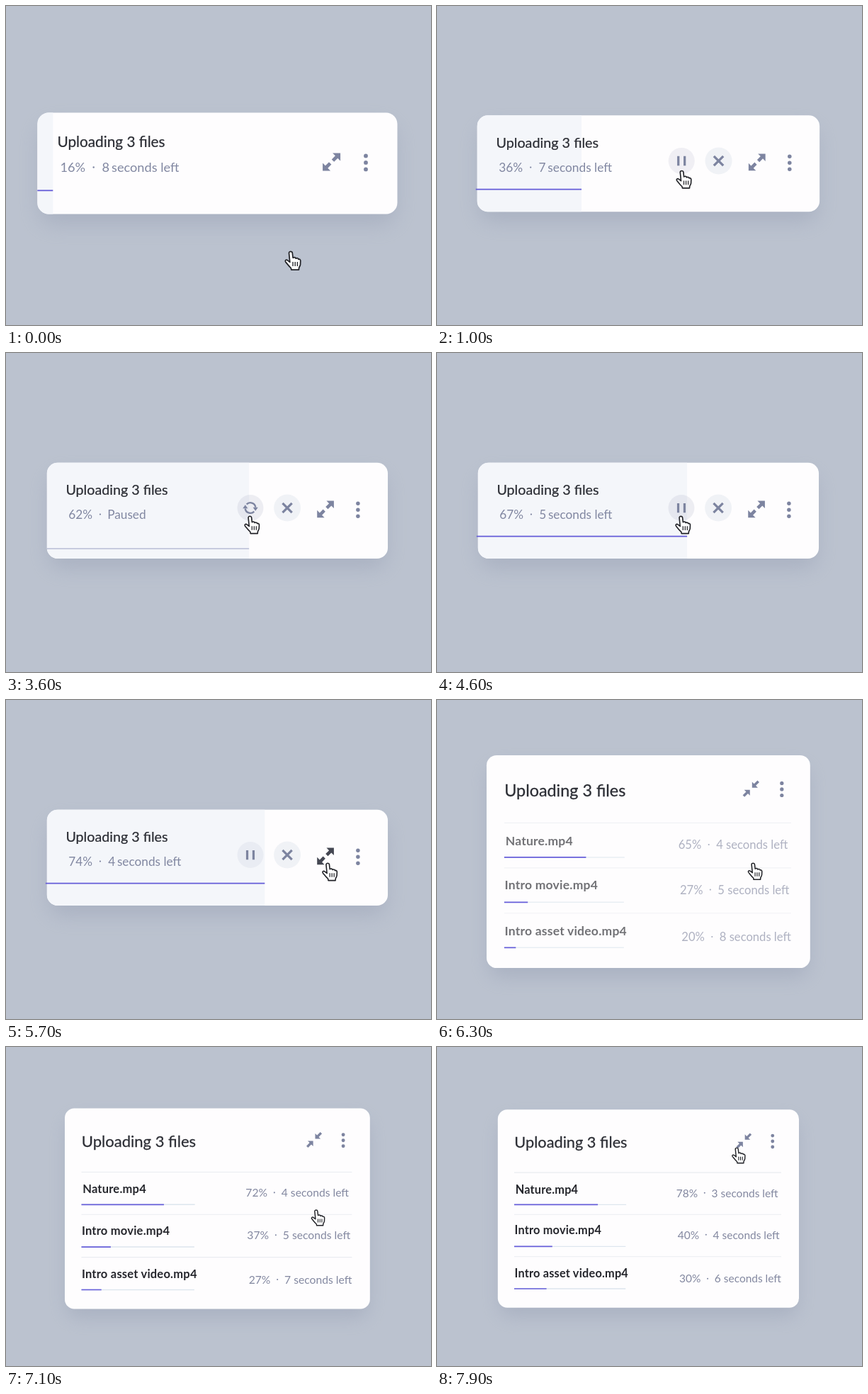
Animation of 600 by 450 pixels, one loop 8 s. Source, as an HTML page:

```html
<!DOCTYPE html>
<html lang="en">
<head>
<meta charset="utf-8">
<title>Upload card</title>
<style>
  html, body { margin: 0; width: 100%; height: 100%; overflow: hidden; background: #bbc2cf; }
  svg { display: block; width: 600px; height: 450px; }
  text { font-family: Lato, "Open Sans", sans-serif; white-space: pre; }
  .title { font-size: 20.8px; fill: #2c2e35; stroke: #2c2e35; stroke-width: .25px; }
  .sub { font-size: 18.2px; fill: #8187a1; }
  .meta { font-size: 18.5px; fill: #8388a0; }
  .name { font-size: 19.5px; font-weight: 700; letter-spacing: .25px; fill: #25262c; }
  .icon { fill: #7d84a0; }
  .stroke { fill: none; stroke: #7d84a0; }
</style>
</head>
<body>
<svg viewBox="0 0 600 450">
  <defs>
    <filter id="blur" x="-20%" y="-40%" width="140%" height="180%"><feGaussianBlur stdDeviation="15"/></filter>
    <clipPath id="clip"><rect id="clipRect" x="44.3" width="508.2" rx="16"/></clipPath>
  </defs>
  <rect width="600" height="450" fill="#bbc2cf"/>
  <g id="camera">
    <rect id="shadow" x="48" width="501" rx="18" fill="#8f98ad" opacity=".4" filter="url(#blur)"/>
    <rect id="card" x="44.3" width="508.2" rx="16" fill="#fefdfe"/>

    <g id="compact">
      <rect id="fill" x="44.3" y="150" height="144" fill="#f4f6fa" clip-path="url(#clip)"/>
      <path id="line" fill="none" stroke-width="1.8"/>
      <text id="percent" class="sub" x="76.5" y="234.5"></text>
      <circle cx="123.7" cy="227.5" r="1.2" class="icon"/>
      <g id="left">
        <text id="seconds" class="sub" x="135.5" y="234.5"></text>
        <text class="sub" x="149" y="234.5">seconds left</text>
      </g>
      <text id="paused" class="sub" x="134.5" y="234.5">Paused</text>
      <g id="toggle">
        <circle id="halo" r="19.5" fill="#7d84a0"/>
        <path id="pause" class="icon" d="M-6.4-7h3.4v14h-3.4zM3-7h3.4v14h-3.4z"/>
        <g id="sync">
          <path class="stroke" stroke-width="2.5" d="M-5.6-5.4A7.8 7.8 0 0 1 7.7-1M5.6 5.4A7.8 7.8 0 0 1-7.7 1"/>
          <path class="icon" d="M3.8-.8H11.4L7.6 4.4zM-3.8.8H-11.4L-7.6-4.4z"/>
        </g>
      </g>
      <g id="cancel">
        <circle r="20" fill="#f0f2f6"/>
        <path class="stroke" stroke-width="3.5" d="M-7-7L7 7M7-7L-7 7"/>
      </g>
    </g>

    <g id="rows"><g id="faded"></g><g id="bars" fill="none" stroke="#675fda" stroke-width="1.9"></g></g>
    <text id="title" class="title">Uploading 3 files</text>
    <g id="icons">
      <path id="expand" d="M12.5-12.5V-1.5L8.7-5.3L3.6-.2L.2-3.6L5.3-8.7L1.5-12.5zM-12.5 12.5V1.5L-8.7 5.3L-3.6 .2L-.2 3.6L-5.3 8.7L-1.5 12.5z"/>
      <path id="collapse" class="icon" d="M1.7-1.7V-10.7L4.8-7.6L10.2-13L13-10.2L7.6-4.8L10.7-1.7zM-1.7 1.7V10.7L-4.8 7.6L-10.2 13L-13 10.2L-7.6 4.8L-10.7 1.7z"/>
      <g class="icon"><circle cx="48.4" cy="-8.6" r="2.9"/><circle cx="48.4" cy=".9" r="2.9"/><circle cx="48.4" cy="10.4" r="2.9"/></g>
    </g>
    <g id="cursor">
      <path fill="#fff" stroke="#202126" stroke-width="1.7" stroke-linejoin="round"
        d="M-2.3 1.8C-2.3-.8 2.2-.8 2.5 1.8L3.3 8.6C5 7.5 7 8 7.3 9.6C9 8.6 10.8 9.2 11 10.7C13 10 14 11.5 14 13L13.8 18C13.5 20.5 12 21.5 11.8 23L11.6 25.5H1L.5 23C-2 21-4.5 17.5-7 14.5C-8.5 12.5-6.5 10.8-4.5 12L-1 14.8Z"/>
      <path fill="none" stroke="#202126" stroke-width="1.3" d="M3.2 14.5V20.5M6.4 14.5V20.5M9.6 14.5V20.5"/>
    </g>
  </g>
</svg>
<script>
const LOOP = 8000, CX = 298.4, CY = 228;
const LEFT = 44.3, WIDTH = 508.2;
const $ = id => document.getElementById(id);
const set = (el, attrs) => { for (const k in attrs) el.setAttribute(k, attrs[k]); };
const clamp = v => Math.min(1, Math.max(0, v));
const span = (t, a, b) => clamp((t - a) / (b - a));
const mix = (a, b, p) => a + (b - a) * p;
const smooth = v => .5 - .5 * Math.cos(Math.PI * clamp(v));
const easeOut = (v, power) => 1 - Math.pow(1 - v, power);
const blend = (a, b, p) => `rgb(${a.map((v, i) => Math.round(mix(v, b[i], p)))})`;
const at = (x, y, extra = '') => ({ transform: `translate(${x} ${y}) ${extra}` });

// Piecewise linear value through [time, value] points.
function track(t, keys) {
  for (let i = 1; i < keys.length; i++) {
    const [a, va] = keys[i - 1], [b, vb] = keys[i];
    if (t <= b) return mix(va, vb, span(t, a, b));
  }
  return keys[keys.length - 1][1];
}

const files = [
  { name: 'Nature.mp4', x: 74, metaX: 345.5, rule: 167.2, base: 202.4, meta: 208.3, bar: 221.3, end: 261,
    pct: [[6300, 65], [7100, 72], [7900, 78]], done: [[5900, .65], [6300, .68], [7100, .727], [7900, .747]],
    secs: t => t < 7500 ? 4 : 3 },
  { name: 'Intro movie.mp4', x: 72.6, metaX: 347.9, rule: 237.8, base: 271.4, meta: 279, bar: 291.8, end: 260,
    pct: [[6300, 27], [7100, 37], [7900, 40]], done: [[5900, .16], [6300, .197], [7100, .26], [7900, .342]],
    secs: t => t < 7500 ? 5 : 4 },
  { name: 'Intro asset video.mp4', x: 72.6, metaX: 350.6, rule: 308.9, base: 343.6, meta: 352.9, bar: 363, end: 260,
    pct: [[6300, 20], [7100, 27], [7900, 30]], done: [[5900, .05], [6300, .097], [7100, .177], [7900, .29]],
    secs: t => t < 6700 ? 8 : t < 7500 ? 7 : 6 }
];

function add(parent, tag, attrs, text = '') {
  const el = document.createElementNS('http://www.w3.org/2000/svg', tag);
  set(el, attrs);
  el.textContent = text;
  $(parent).append(el);
  return el;
}

function addRow(file) {
  add('faded', 'path', { d: `M72 ${file.rule}H522.5`, stroke: '#e9ecf1', 'stroke-width': 1.3 });
  add('faded', 'text', { class: 'name', x: file.x, y: file.base }, file.name);
  add('faded', 'path', { d: `M72 ${file.bar}H${file.end}`, stroke: '#dde6ee', 'stroke-width': 1.7 });
  file.pctText = add('faded', 'text', { class: 'meta', x: file.metaX, y: file.meta });
  add('faded', 'circle', { class: 'icon', cx: file.metaX + 47.8, cy: file.meta - 7, r: 1.2 });
  file.secText = add('faded', 'text', { class: 'meta', x: file.metaX + 59.5, y: file.meta });
  file.progress = add('bars', 'path', {});
}
files.forEach(addRow);

// The line drops and rises as a ripple that runs back from its leading end.
function linePath(t, x0, x1) {
  const height = u => {
    const lag = (1 - u) * 284;
    const down = smooth((t - 1926 - lag) / 450);
    const up = smooth((t - 3700 - lag) / 450);
    return 260.3 + 18.4 * (down - up);
  };
  let d = '';
  for (let i = 0; i <= 48; i++) {
    const u = i / 48;
    d += `${i ? 'L' : 'M'}${mix(x0, x1, u).toFixed(2)} ${height(u).toFixed(2)}`;
  }
  return d;
}

function drawCompact(t, open) {
  const edge = LEFT + WIDTH * track(t, [[0, .043], [1900, .54], [2300, .577], [2700, .593], [3700, .593], [5700, .639]]);
  const grey = span(t, 2400, 2850) - span(t, 3650, 3900);
  const start = LEFT - 2 * span(t, 0, 200) * (1 - grey);
  set($('compact'), { opacity: 1 - span(open, 0, .6) });
  set($('fill'), { width: edge - LEFT });
  set($('line'), { d: linePath(t, start, edge), stroke: blend([101, 92, 216], [184, 189, 213], grey) });

  $('percent').textContent = Math.floor(track(t, [[0, 16], [2200, 62], [3700, 62], [5650, 74]])) + '%';
  $('seconds').textContent = t < 900 ? 8 : t < 1800 ? 7 : t < 4400 ? 6 : t < 5100 ? 5 : 4;
  const rest = span(t, 2400, 2650) - span(t, 3750, 3950);
  set($('left'), { opacity: 1 - rest });
  set($('paused'), { opacity: rest });

  const shown = smooth(span(t, 550, 1000));
  const size = mix(.7, 1, shown);
  const swap = smooth(span(t, 1850, 2150)) - smooth(span(t, 3650, 3950));
  const hover = span(t, 900, 1100) - span(t, 4600, 4800);
  set($('toggle'), { ...at(347.6, 218, `scale(${size})`), opacity: shown });
  set($('cancel'), { ...at(402.6, 218, `scale(${size})`), opacity: shown });
  set($('halo'), { opacity: mix(.09, .13, hover) });
  set($('pause'), { opacity: 1 - swap });
  set($('sync'), { opacity: swap, transform: `rotate(${-120 * (1 - swap)})` });
}

function drawRows(t) {
  set($('faded'), { opacity: track(t, [[5980, 0], [6300, .64], [6600, 1]]) });
  set($('bars'), { opacity: span(t, 5980, 6250) });
  for (const file of files) {
    const x = mix(72, file.end, track(t, file.done));
    set(file.progress, { d: `M72 ${file.bar}H${x}` });
    file.pctText.textContent = Math.floor(track(t, file.pct) + .01) + '%';
    file.secText.textContent = file.secs(t) + ' seconds left';
  }
}

function drawCursor(t) {
  const enter = smooth(span(t, 0, 1100));
  const across = smooth(span(t, 4600, 5300));
  const lift = smooth(span(t, 7200, 7800));
  const x = 401.8 - 55 * enter + 116 * across - 15.3 * lift;
  const y = 346.6 - 116 * enter - 104.8 * lift;
  const press = [1800, 3600, 5700].reduce((sum, c) => sum + Math.max(0, 1 - Math.abs(t - c - 60) / 60), 0);
  set($('cursor'), at(x, y, `scale(${1 - .08 * press})`));
}

function draw(t) {
  const scale = 1 - .053 * easeOut(span(t, 0, 1400), 2)
                  - .1104 * easeOut(span(t, 5900, 8000), 2.7);
  set($('camera'), at(CX, CY, `scale(${scale}) translate(${-CX} ${-CY})`));

  const open = easeOut(span(t, 5800, 6230), 2.2);
  const y = mix(150.6, 61, open), height = mix(142.8, 334, open);
  set($('card'), { y, height });
  set($('clipRect'), { y, height });
  set($('shadow'), { y: y + 18, height: height - 4 });

  drawCompact(t, open);
  drawRows(t);
  set($('title'), at(72.4, mix(198.8, 125.8, open), `scale(${mix(1, 1.25, open)})`));
  set($('icons'), at(459.6, mix(220, 113.6, open)));
  set($('expand'), { opacity: 1 - open, fill: blend([125, 132, 160], [68, 71, 82], span(t, 4950, 5250)) });
  set($('collapse'), { opacity: open });
  drawCursor(t);
}

function tick() {
  draw(performance.now() % LOOP);
  requestAnimationFrame(tick);
}
draw(0);
requestAnimationFrame(tick);
</script>
</body>
</html>
```
